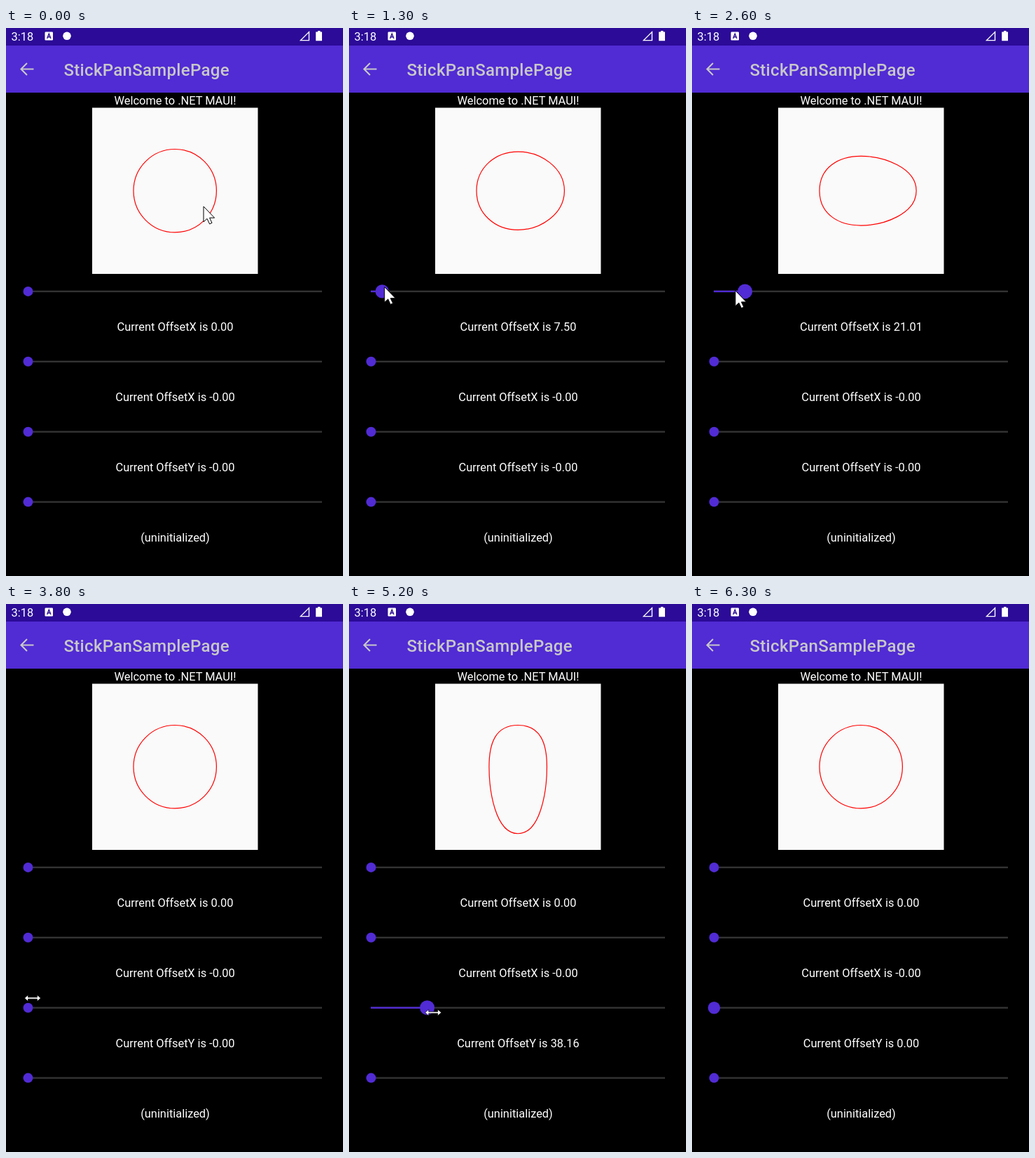
Write an HTML page that moves like this. It is 481 px wide and 780 px high and loops after 6900 ms.

```html
<!DOCTYPE html>
<html lang="en">
<head>
<meta charset="utf-8">
<title>Stick pan sample</title>
<style>
  html, body { margin: 0; width: 100%; height: 100%; overflow: hidden; background: #000; }
  svg { display: block; width: 481px; height: 780px; }
  text { font: 16.4px Roboto, sans-serif; fill: #fff; }
  .mid { text-anchor: middle; }
  .title { font-size: 24px; font-weight: 500; letter-spacing: .0125em; fill: #c8c8c8; }
</style>
</head>
<body>
<svg viewBox="0 0 481 780" xmlns="http://www.w3.org/2000/svg">
  <rect width="481" height="780"/>
  <rect y="25" width="481" height="67" fill="#512bd4"/>
  <rect width="481" height="25" fill="#2b0b98"/>

  <text x="7.5" y="18">3:18</text>
  <rect x="55.5" y="5.5" width="11.5" height="12" rx="1.3" fill="#fff"/>
  <path d="M58.6 15 61.3 8.2 64 15M59.6 12.8H63" fill="none" stroke="#2b0b98" stroke-width="1.4"/>
  <circle cx="87" cy="11.3" r="5.8" fill="#fff"/>
  <path d="M420.5 17.6H432.5V5.6Z" fill="none" stroke="#fff" stroke-width="1.4"/>
  <path d="M445 4h3.5v1.6h2.5v12.6h-8.8V5.6h2.8Z" fill="#fff"/>

  <path d="M39.5 58.5H22M30 50 21.5 58.5 30 67" fill="none" stroke="#c8c8c8" stroke-width="2.1"/>
  <text class="title" x="82.5" y="68">StickPanSamplePage</text>

  <text class="mid" x="241.5" y="109">Welcome to .NET MAUI!</text>
  <rect x="123" y="113.5" width="236.5" height="236.5" fill="#fafafa"/>
  <path id="blob" fill="none" stroke="#f00" stroke-width="1.2"/>
  <g id="sliders"></g>

  <path id="arrow" d="M0 0V22L5 17.4 8.6 25 12 23.4 8.6 16.2H15.6Z" fill="#fff" stroke="#000"/>
  <path id="resize" d="M-11.5 0-6.5-4.5V-1.2H6.5V-4.5L11.5 0 6.5 4.5V1.2H-6.5V4.5Z" fill="#fff" stroke="#000" stroke-width=".7"/>
</svg>
<script>
const LOOP = 6900, STEP = 100;
const LEFT = 31.5, SCALE = 2.1;   // slider start and pixels per unit
const LEAD = 140;                 // how far the pointer runs ahead of the thumb, in ms

const $ = id => document.getElementById(id);
const ramp = (t, a, b) => Math.min(1, Math.max(0, (t - a) / (b - a)));
const mix = (a, b, u) => a + (b - a) * u;
const smooth = u => u * u * (3 - 2 * u);

// Turning points of each drag as [ms, units]; below zero the pointer has left the slider.
const dragX = {
  from: 1000, to: 3100,
  keys: [[1000, 0], [1300, 7.5], [1600, 11], [1800, 19.72], [2350, 34], [2600, 21.01], [3050, 0], [3200, -14]]
};
const dragY = {
  from: 4400, to: 6200,
  keys: [[4350, 0], [5200, 38.16], [5400, 44], [5700, 19], [6200, -9.5]]
};

function reach({ keys }, t) {
  let v = keys[0][1];
  for (let i = 1; i < keys.length; i++) {
    const [a] = keys[i - 1], [b, end] = keys[i];
    v = mix(v, end, ramp(t, a, b));
  }
  return v;
}

const pan = (drag, t) => Math.max(0, reach(drag, t));
const grip = ({ from, to }, t) => 7 + 3.5 * (ramp(t, from, from + 400) - ramp(t, to, to + 200));
const lead = (drag, t) => LEFT + SCALE * reach(drag, t + LEAD);

function pointer(t) {
  if (t < dragX.from) {
    const u = smooth(ramp(t, 0, 700));
    return [mix(282, 34, u), mix(254, 369, u)];
  }
  if (t <= dragX.to) return [lead(dragX, t), 368.5 + 7 * ramp(t, 2300, 2700)];
  if (t < dragY.from) {
    const u = smooth(ramp(t, 3100, 3800)), settle = ramp(t, 3800, 4100);
    return [mix(2, 38, u) - 3.5 * settle, mix(376, 561, u) + 14 * settle];
  }
  return [lead(dragY, t), 575 + 9 * ramp(t, dragY.from, 5500)];
}

function add(tag, attrs) {
  const el = document.createElementNS("http://www.w3.org/2000/svg", tag);
  for (const k in attrs) el.setAttribute(k, attrs[k]);
  return $("sliders").appendChild(el);
}

function makeSlider(y) {
  const bar = (width, fill) => add("rect", { x: 31, y: y - 1.2, width, height: 2.4, fill });
  bar(420, "#333");
  return {
    fill: bar(0, "#512bd4"),
    thumb: add("circle", { cx: LEFT, cy: y, r: 7, fill: "#512bd4" }),
    label: add("text", { class: "mid", x: 241.5, y: y + 56.5 })
  };
}

const sliders = [0, 1, 2, 3].map(i => makeSlider(374.9 + 99.9 * i));
sliders[1].label.textContent = "Current OffsetX is -0.00";
sliders[3].label.textContent = "(uninitialized)";

function setSlider({ fill, thumb, label }, value, r, text) {
  fill.setAttribute("width", value * SCALE);
  thumb.setAttribute("cx", LEFT + value * SCALE);
  thumb.setAttribute("r", r);
  label.textContent = text;
}

// A circle stretched to one side and squeezed across, with fixed handles.
function blobPath(x, y) {
  const cx = 241.2, cy = 231.7, r = 59.2, k = r * 0.5523;
  const right = cx + r + x - y / 2, left = cx - r + y / 2;
  const top = cy - r + x / 2, bottom = cy + r + y - x / 2;
  return `M${cx} ${top}C${cx + k} ${top} ${right} ${cy - k} ${right} ${cy}` +
    `S${cx + k} ${bottom} ${cx} ${bottom}S${left} ${cy + k} ${left} ${cy}` +
    `S${cx - k} ${top} ${cx} ${top}Z`;
}

function showPointer(id, on, [x, y]) {
  $(id).setAttribute("visibility", on ? "visible" : "hidden");
  $(id).setAttribute("transform", `translate(${x} ${y})`);
}

function draw(ms) {
  const t = Math.floor((ms % LOOP) / STEP) * STEP;
  const x = pan(dragX, t), y = pan(dragY, t), at = pointer(t);
  const sign = t < dragY.from ? "-" : "";
  setSlider(sliders[0], x, grip(dragX, t), `Current OffsetX is ${x.toFixed(2)}`);
  setSlider(sliders[2], y, grip(dragY, t), `Current OffsetY is ${sign}${y.toFixed(2)}`);
  $("blob").setAttribute("d", blobPath(x * 0.94, y * 0.94));
  showPointer("arrow", t < 3800, at);
  showPointer("resize", t >= 3800 && t < 6300, at);
}

const start = performance.now();
function tick() {
  draw(performance.now() - start);
  requestAnimationFrame(tick);
}
tick();
</script>
</body>
</html>
```
